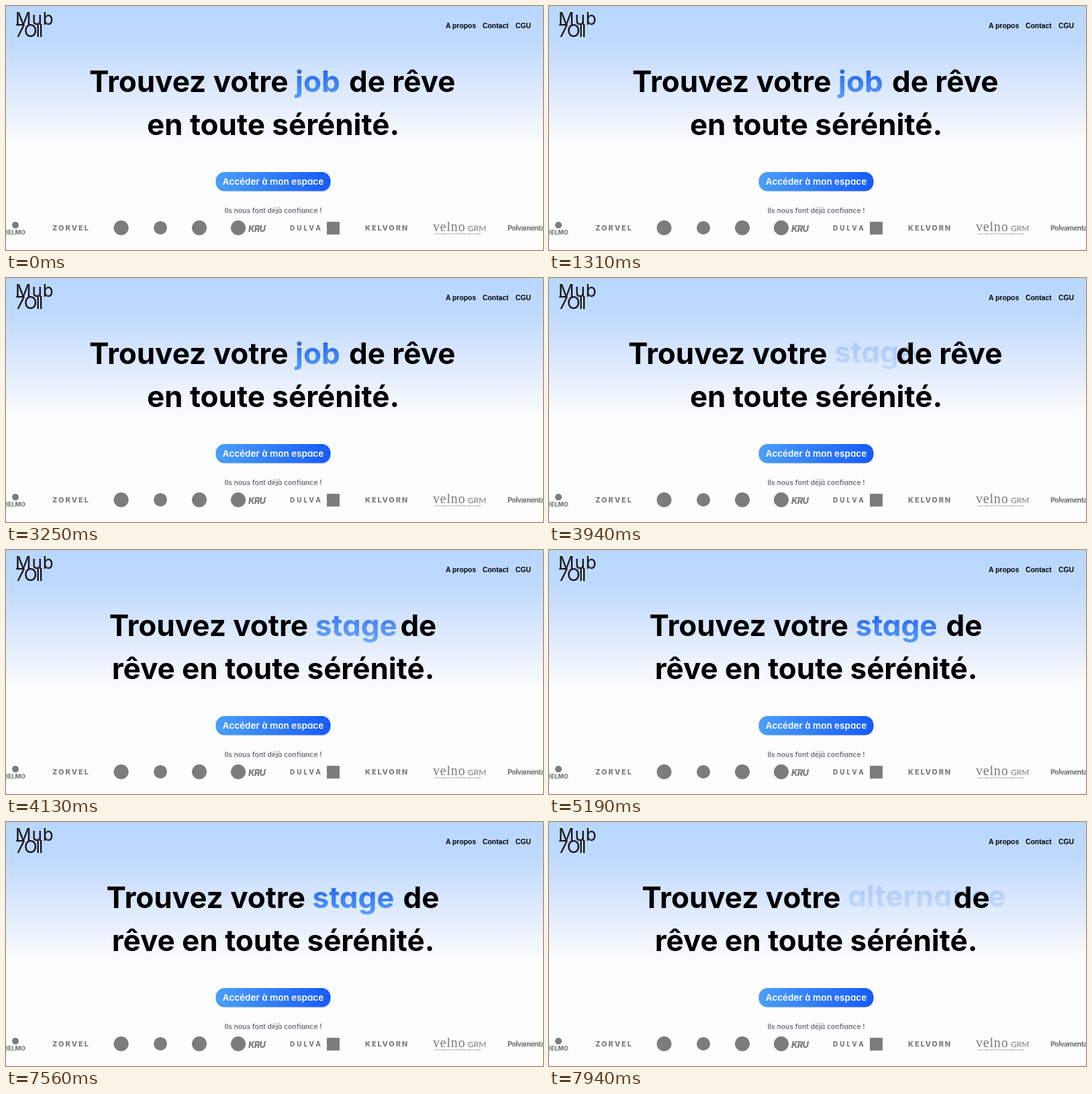
Animation of 800 by 363 pixels, one loop 8000 ms. Source, as an HTML page:

```html
<!DOCTYPE html>
<html lang="fr">
<head>
<meta charset="utf-8">
<title>Trouvez votre job</title>
<style>
html, body { margin: 0; width: 100%; height: 100%; overflow: hidden; background: #fdfdfd; }
svg { display: block; width: 100%; height: 100%; }
text { font-family: Inter, "Open Sans", sans-serif; font-feature-settings: "cv11"; white-space: pre; }
.title { font-size: 44px; font-weight: 700; }
.mid { text-anchor: middle; }
.nav { font: 700 10.4px "Liberation Sans", Arial, sans-serif; }
.brand { font-size: 26px; }
.logos { fill: #7c7c7c; }
.logos text { font-weight: 800; }
</style>
</head>
<body>
<svg viewBox="0 0 800 363">
  <defs>
    <linearGradient id="sky" gradientUnits="userSpaceOnUse" x1="0" y1="0" x2="0" y2="210">
      <stop offset="0" stop-color="#b8d6fe"/>
      <stop offset=".27" stop-color="#c0dafe"/>
      <stop offset=".62" stop-color="#dfeafd"/>
      <stop offset=".86" stop-color="#f2f6fd"/>
      <stop offset="1" stop-color="#fdfdfd"/>
    </linearGradient>
    <linearGradient id="ink" gradientUnits="userSpaceOnUse" x1="0" y1="92" x2="0" y2="140">
      <stop offset="0" stop-color="#2360ec"/>
      <stop offset="1" stop-color="#58a4fc"/>
    </linearGradient>
    <linearGradient id="btn">
      <stop offset="0" stop-color="#4b9efc"/>
      <stop offset="1" stop-color="#175afb"/>
    </linearGradient>
  </defs>
  <rect width="800" height="363" fill="#fdfdfd"/>
  <rect width="800" height="210" fill="url(#sky)"/>

  <g class="brand" fill="#111">
    <text x="14" y="28" letter-spacing="1">Mub</text>
    <text x="14" y="46" letter-spacing="-2">7Oll</text>
  </g>
  <g class="nav">
    <text class="nav" x="655" y="32.5">A propos</text>
    <text class="nav" x="710" y="32.5">Contact</text>
    <text class="nav" x="759" y="32.5">CGU</text>
  </g>

  <g class="title">
    <text id="lead" y="128">Trouvez votre</text>
    <text id="word" y="128" fill="url(#ink)"></text>
    <text id="tail" y="128"></text>
    <text id="second" class="mid" x="398" y="192"></text>
  </g>

  <rect x="312.5" y="247" width="171" height="28.5" rx="13" fill="url(#btn)"/>
  <text class="mid" x="398" y="266" font-size="13.5" font-weight="600" fill="#fff">Accéder à mon espace</text>
  <text class="mid" x="398" y="308" font-size="10.4" font-weight="600" fill="#6f7278">Ils nous font déjà confiance !</text>

  <g class="logos">
    <circle cx="14" cy="326" r="5"/>
    <text x="29" y="339.5" font-size="9" text-anchor="end">DELMO</text>
    <text x="69" y="334" font-size="11" letter-spacing="2">ZORVEL</text>
    <circle cx="171.5" cy="330" r="11"/>
    <circle cx="230" cy="330" r="10"/>
    <circle cx="288" cy="330" r="11"/>
    <circle cx="346" cy="330" r="11"/>
    <text x="361" y="335.5" font-size="13" font-style="italic" letter-spacing="-.8">KRU</text>
    <text x="423" y="333.5" font-size="10" letter-spacing="3">DULVA</text>
    <rect x="478" y="321" width="19" height="19"/>
    <text x="535" y="334" font-size="11" letter-spacing="1.8">KELVORN</text>
    <text x="636" y="335" style="font: 400 20px 'Liberation Serif', serif" letter-spacing=".8">velno</text>
    <text x="688" y="335" style="font: 400 12px Lato, sans-serif">GRM</text>
    <text x="638" y="340" style="font: 400 3.2px 'Open Sans', sans-serif">centre régional de formation par apprentissage</text>
    <text x="747" y="334" style="font: 900 11px Lato, sans-serif" letter-spacing="-.4">Polvamental</text>
  </g>
</svg>
<script>
const LOOP = 8000, FADE = 300, CENTER = 398;
const LEAD = 307, SPACE = 12, SHORT_TAIL = 55, LONG_TAIL = 161, MAX_LINE = 561;
const words = [
  { text: "job", width: 68, start: -FADE },
  { text: "stage", width: 123, start: 3876 },
  { text: "alternance", width: 240, start: 7883 }
];
const [lead, word, tail, second] = ["lead", "word", "tail", "second"].map(id => document.getElementById(id));

function setText(el, value) {
  if (el.textContent !== value) el.textContent = value;
}

function draw(t) {
  const i = words.findLastIndex(w => t >= w.start);
  const cur = words[i], prev = words[i - 1] || cur, next = words[i + 1];
  const enter = Math.min(1, (t - cur.start) / FADE);
  const exit = next ? Math.max(0, 1 - (next.start - t) / FADE) : 0;
  const width = prev.width + (cur.width - prev.width) * enter;

  // The last word wraps once the growing line no longer fits.
  const base = LEAD + width + SPACE;
  const fits = base + LONG_TAIL <= MAX_LINE;
  const x = CENTER - (base + (fits ? LONG_TAIL : SHORT_TAIL)) / 2;

  setText(word, cur.text);
  setText(tail, fits ? "de rêve" : "de");
  setText(second, fits ? "en toute sérénité." : "rêve en toute sérénité.");
  lead.setAttribute("x", x);
  word.setAttribute("x", x + LEAD);
  tail.setAttribute("x", x + base);
  word.setAttribute("opacity", enter * (1 - exit));
  word.setAttribute("transform", `translate(0 ${-2.5 * (1 - enter)})`);
}

function tick() {
  draw(performance.now() % LOOP);
  requestAnimationFrame(tick);
}
tick();
</script>
</body>
</html>
```
